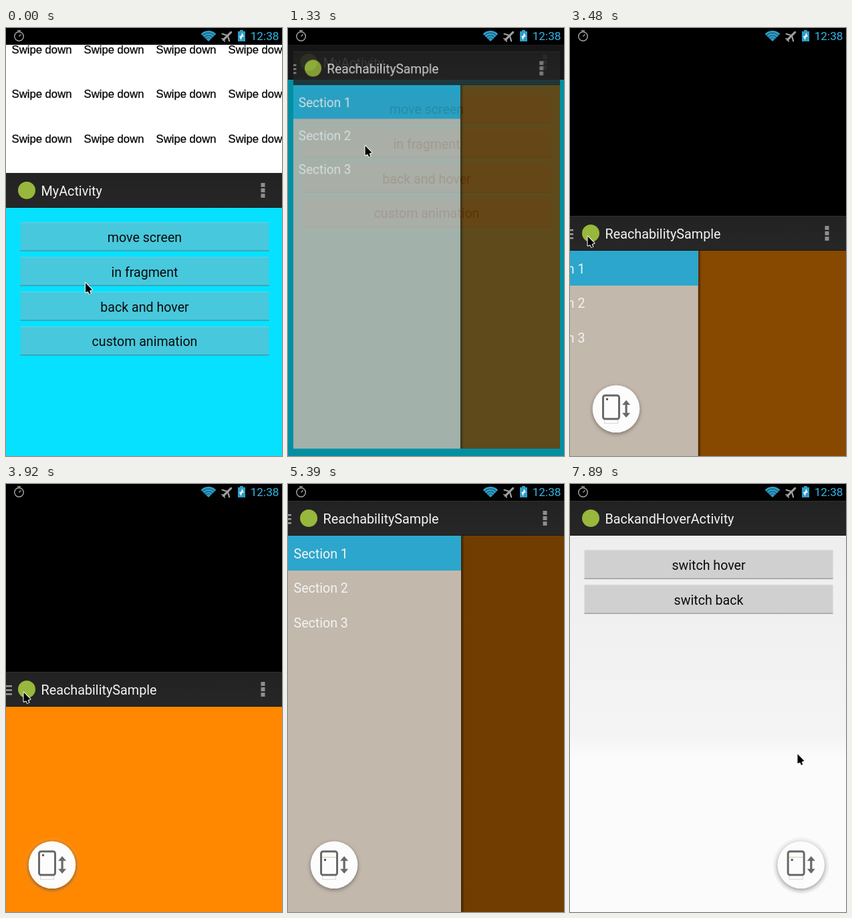
Recreate the animation shown at these times as an HTML page with a canvas. Size 413x638 px, loop 8 s.

```html
<!DOCTYPE html>
<html lang="en">
<head>
<meta charset="utf-8">
<title>Reachability demo</title>
<style>
html, body { margin: 0; width: 413px; height: 638px; overflow: hidden; background: #000; }
canvas { display: block; }
</style>
</head>
<body>
<canvas id="stage" width="413" height="638"></canvas>
<script>
const W = 413, H = 638, TOP = 25, BAR = 52, BODY = TOP + BAR;
const LOOP = 8000, BEAT = 145.6, LAST = 54;
const DRAWER = 259;

const stage = document.getElementById('stage').getContext('2d');
const sheet = document.createElement('canvas');
sheet.width = W;
sheet.height = H;
const layer = sheet.getContext('2d');
let c = stage;

// Progress from 0 to 1 between beats a and b
const ramp = (n, a, b) => Math.min(1, Math.max(0, (n - a) / (b - a)));
const ease = (n, a, b) => 0.5 - Math.cos(Math.PI * ramp(n, a, b)) / 2;

function box(x, y, w, h, fill) {
  c.fillStyle = fill;
  c.fillRect(x, y, w, h);
}

function label(s, x, y, size, fill, align = 'left', font = 'Roboto') {
  c.font = `${size}px ${font}, sans-serif`;
  c.textAlign = align;
  c.fillStyle = fill;
  c.fillText(s, x, y);
}

function disc(x, y, r, fill) {
  c.beginPath();
  c.arc(x, y, r, 0, 7);
  c.fillStyle = fill;
  c.fill();
}

function line(x0, y0, x1, y1, width, color) {
  c.beginPath();
  c.moveTo(x0, y0);
  c.lineTo(x1, y1);
  c.lineWidth = width;
  c.strokeStyle = color;
  c.stroke();
}

// Triangle with its tip at (x, y), opening towards dy
function wedge(x, y, half, dy, fill) {
  c.beginPath();
  c.moveTo(x, y);
  c.lineTo(x + half, y + dy);
  c.lineTo(x - half, y + dy);
  c.fillStyle = fill;
  c.fill();
}

function fan(r, fill) {
  c.beginPath();
  c.moveTo(303, 19.5);
  c.arc(303, 19.5, r, -Math.PI * 0.76, -Math.PI * 0.24);
  c.fillStyle = fill;
  c.fill();
}

function fade(x0, y0, x1, y1, from, to) {
  const g = c.createLinearGradient(x0, y0, x1, y1);
  g.addColorStop(0, from);
  g.addColorStop(1, to);
  return g;
}

function statusBar() {
  const grey = '#a0a0a0', blue = '#2f9cc6';
  box(0, 0, W, TOP, '#000');
  disc(19.5, 12.5, 7.5, grey);
  disc(19.5, 12.5, 6, '#000');
  line(19.5, 12.5, 22.5, 9.5, 1.5, grey);
  line(17, 4, 22, 4, 1.5, grey);

  for (let r = 15.5; r > 2; r -= 3.8) {
    fan(r, blue);
    fan(r - 3, '#0b3a4c');
  }
  fan(4, blue);

  c.save();
  c.translate(331, 12);
  c.rotate(Math.PI / 4);
  c.lineCap = 'round';
  line(0, -8, 0, 8, 3, grey);
  for (const side of [-1, 1]) {
    line(0, -1, side * 7.5, 3, 2.2, grey);
    line(0, 6.5, side * 3.2, 8.5, 1.5, grey);
  }
  c.restore();

  box(350, 3, 5, 2, blue);
  box(347, 5, 11, 15, blue);
  wedge(353.5, 7, 2.5, 6, '#e8f8ff');
  wedge(351.5, 18, 2.5, -6, '#e8f8ff');
  label('12:38', 408.5, 18, 17.2, '#33b5e5', 'right');
}

function actionBar(title, menu) {
  box(0, TOP, W, BAR, fade(0, TOP, 0, BODY, '#222', '#272727'));
  box(0, TOP, W, 1, '#303030');
  box(0, BODY - 1, W, 1, '#191919');
  disc(31, 51, 13, '#97b83c');
  label(title, 52.5, 58.5, 19.8, '#f4f4f4');
  if (menu) for (let y = 40; y < 60; y += 8) box(381.5, y, 6, 6, '#8e8e8e');
}

function buttons(names, fill, edge, shine) {
  names.forEach((s, row) => {
    const y = 98.5 + row * 51.8;
    box(21.5, y, 372, 43, fill);
    box(21.5, y, 372, 1, shine);
    box(21.5, y + 42, 372, 1.2, edge);
    label(s, 207.5, y + 29.4, 19.6, '#0b0b0b', 'center');
  });
}

function mainScreen() {
  box(0, BODY, W, H, '#05e1ff');
  actionBar('MyActivity', true);
  buttons(['move screen', 'in fragment', 'back and hover', 'custom animation'],
    '#48c8dc', '#3c8f9c', '#68d2e2');
}

function drawerScreen(slide) {
  const light = 1 - 0.555 * Math.pow(slide, 0.55);
  const x = (slide - 1) * DRAWER, edge = slide * DRAWER;
  box(0, BODY, W, H, `rgb(${255 * light},${136 * light},0)`);
  if (slide > 0) {
    box(edge, BODY, 5, H, fade(edge, 0, edge + 5, 0, 'rgba(0,0,0,.5)', 'rgba(0,0,0,0)'));
    box(x, BODY, DRAWER, H, '#c2b8ac');
    box(x, BODY, DRAWER, BAR, '#2ca6cc');
    for (let i = 0; i < 3; i++)
      label(`Section ${i + 1}`, x + 8.5, 110.5 + i * 51.5, 19.6, '#f3f3f3');
  }
  actionBar('ReachabilitySample', true);
  const reach = 5 + 4 * Math.max(0, 1 - slide * 2);
  for (let y = 45; y < 60; y += 6) box(0, y, reach, 2.5, '#9a9a9a');
}

function hoverScreen() {
  box(0, BODY, W, H, fade(0, BODY, 0, 390, '#eee', '#f4f4f4'));
  box(0, 375, W, H, fade(0, 375, 0, 410, '#f4f4f4', '#fbfbfb'));
  actionBar('BackandHoverActivity', false);
  buttons(['switch hover', 'switch back'], '#d0d0d0', '#929292', '#d9d9d9');
}

function hoverButton(x, up) {
  const grey = '#696969';
  c.save();
  c.translate(x, 567.8);
  disc(0, 1, 42, 'rgba(200,190,180,.12)');
  c.shadowColor = 'rgba(0,0,0,.4)';
  c.shadowBlur = 6;
  c.shadowOffsetY = 2;
  disc(0, 0, 35.3, '#fcfcfc');
  c.shadowColor = 'transparent';
  c.lineWidth = 1;
  c.strokeStyle = '#d8d8d8';
  c.strokeRect(-17.5, 12, 20, 9.5);
  c.fillStyle = '#fcfcfc';
  c.strokeStyle = grey;
  c.lineWidth = 3;
  c.beginPath();
  c.roundRect(-19.5, -20, 24, 35, 3);
  c.fill();
  c.stroke();
  if (up) box(-17.5, -12, 20, 1, '#cfc9a0');
  box(-15, up ? -9 : -16, 3, 3, '#555');
  line(15.1, -8, 15.1, 8, 3.2, grey);
  wedge(15.1, -13, 6, 7, grey);
  wedge(15.1, 13, 6, -7, grey);
  c.restore();
}

function backPattern() {
  box(0, TOP, W, H, '#fff');
  c.strokeStyle = '#080808';
  c.lineWidth = 0.3;
  for (let y = 37.5; y < 240; y += 66.7)
    for (let x = 8.5; x < W; x += 108) {
      label('Swipe down', x, y, 16.7, '#080808', 'left', 'Liberation Sans');
      c.strokeText('Swipe down', x, y);
    }
}

// Pointer moves: first beat, last beat, x, y
const moves = [[0, 6, 115, 175], [10, 15, 76, 570], [18, 22, 26, 310], [27, 31, 90, 594],
  [33, 36, 110, 650], [41, 47, 160, 226], [50, 54, 340, 402]];

function pointer(n) {
  let x = 118.5, y = 379.5;
  for (const [a, b, tx, ty] of moves) {
    const p = ease(n, a, b);
    x += (tx - x) * p;
    y += (ty - y) * p;
  }
  c.save();
  c.translate(x + 0.5, y + 0.5);
  c.lineJoin = 'round';
  line(3, 8, 7, 16.5, 4.5, '#fff');
  c.beginPath();
  c.moveTo(0, 0);
  c.lineTo(0, 14);
  c.lineTo(10, 10.2);
  c.closePath();
  c.lineWidth = 2;
  c.stroke();
  c.fillStyle = '#000';
  c.fill();
  line(3, 8, 6.7, 16, 2.5, '#000');
  c.restore();
}

// Draws a whole screen as one sheet so that its opacity is uniform
function blend(draw, alpha, scale) {
  layer.clearRect(0, 0, W, H);
  c = layer;
  draw();
  c = stage;
  c.save();
  c.globalAlpha = alpha;
  c.translate(225 * (1 - scale), H / 2 * (1 - scale));
  c.scale(scale, scale);
  c.drawImage(sheet, 0, 0);
  c.restore();
}

function launch(n, start, from, to) {
  const u = ramp(n, start - 1, start + 0.2);
  if (u === 1) return to();
  blend(from, 1 - 0.44 * u, 1);
  blend(to, u, 0.8 + 0.2 * u);
}

function render(t) {
  const n = Math.min(LAST, Math.floor((t + 16) / BEAT));
  const shift = Math.round(H * (0.3 * (1 - ease(n, 0, 4)) + 0.4 * (ease(n, 16, 19.5) - ease(n, 32, 35.5))));
  const slide = 1 - ramp(n, 23.6, 25.14) + ramp(n, 27, 29);
  const drawer = () => drawerScreen(slide);
  c = stage;
  box(0, 0, W, H, '#000');
  if (n < 9 && shift > 0) backPattern();
  c.save();
  c.translate(0, shift);
  if (n < 9) mainScreen();
  else if (n < 41) launch(n, 9, mainScreen, drawer);
  else if (n < 50) {
    mainScreen();
    if (n === 41) blend(drawer, 0.2, 0.9);
  } else launch(n, 50, mainScreen, hoverScreen);
  c.restore();
  if (n > 9 && n < 41) hoverButton(69, shift < 128);
  if (n > 50) hoverButton(345.7, true);
  statusBar();
  pointer(n);
}

function tick() {
  render(performance.now() % LOOP);
  requestAnimationFrame(tick);
}
tick();
</script>
</body>
</html>
```
